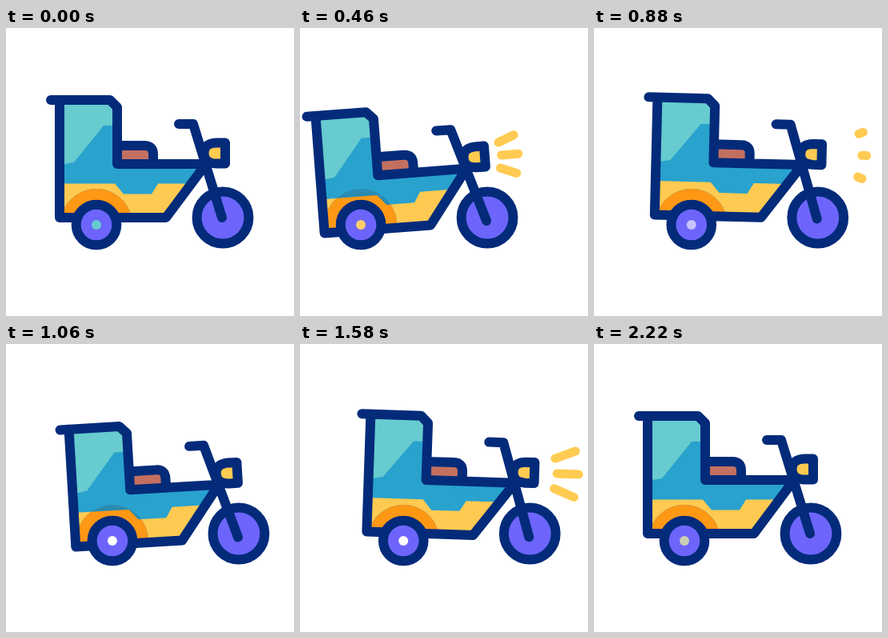
Write an HTML page that moves like this. It is 360x360 px and loops after 2.42 s.

```html
<!DOCTYPE html>
<html lang="en">
<head>
<meta charset="utf-8">
<title>Electric rickshaw</title>
<style>
  html, body { margin: 0; width: 100%; height: 100%; overflow: hidden; background: #fff; }
  svg { display: block; width: 100vw; height: 100vh; }
  .line { fill: none; stroke: #032b7a; stroke-width: 12; stroke-linecap: round; stroke-linejoin: round; }
  .wheel { fill: #6d65fb; stroke: #032b7a; stroke-width: 12; }
  #rays { stroke: #ffcb52; stroke-width: 11; stroke-linecap: round; }
</style>
</head>
<body>
<svg viewBox="0 0 360 360">
  <defs>
    <path id="hull" d="M67 90H130L139 99V170H250L200 237H67Z"/>
    <path id="stripe" d="M67 194.5H136L147 207.5H182L190 194.5H232L200 237H67Z"/>
    <path id="lampShape" d="M274 143.5H263Q247.5 144 247.5 156.5T263 169.5H274Z"/>
    <clipPath id="shell"><use class="tilt" href="#hull"/></clipPath>
    <clipPath id="band"><use class="tilt" href="#stripe"/></clipPath>
  </defs>
  <g id="car">
    <g class="tilt">
      <use href="#hull" fill="#29a2ce"/>
      <path fill="#67cbcf" d="M67 90H130L139 99V122H122L85 168L73 170H67Z"/>
      <use href="#stripe" fill="#ffca51"/>
      <path fill="#c47060" d="M139 147H173Q184 147 184 158V170H139Z"/>
      <use id="lamp" href="#lampShape"/>
      <path fill="#ffca51" d="M265 151H270V161H265Z"/>
    </g>
    <circle cx="113" cy="246" r="45" fill="#2a8cb1" clip-path="url(#shell)"/>
    <circle cx="113" cy="246" r="45" fill="#ff9814" clip-path="url(#band)"/>
    <circle class="wheel" cx="271" cy="237" r="32.4"/>
    <g class="tilt">
      <g class="line">
        <path d="M56 90H130L139 99V170H250L200 237H67V90M139 147H173Q184 147 184 158V170M216 120H234L270 237"/>
        <use href="#lampShape"/>
      </g>
      <g id="rays"><line/><line/><line/></g>
    </g>
    <circle class="wheel" cx="113" cy="246" r="25.3"/>
    <circle id="hub" cx="113" cy="246" r="6"/>
  </g>
</svg>
<script>
const $ = id => document.getElementById(id);
const tilted = document.querySelectorAll('.tilt');
const rays = document.querySelectorAll('#rays line');
const hubShimmer = ['#66cbcf', '#ffd068', '#c8c3fc', '#fff', '#fff', '#ffd068', '#cdcfb4'];

// Progress from 0 to 1 between two times, plain and eased.
const ramp = (t, from, to) => Math.min(1, Math.max(0, (t - from) / (to - from)));
const smooth = (...span) => { const p = ramp(...span); return p * p * (3 - 2 * p); };
const cubic = (...span) => {
  const p = ramp(...span);
  return p < 0.5 ? 4 * p ** 3 : 1 - 4 * (1 - p) ** 3;
};
const mix = (a, b, p) => a + (b - a) * p;

// Back up, surge forward, return.
const drive = t => -37 * cubic(t, 0, 500) + 57 * cubic(t, 500, 1100) - 20 * cubic(t, 1400, 1900);

const sway = t => -4.4 * smooth(t, 0, 480) + 8.4 * smooth(t, 480, 760) - 7.4 * smooth(t, 760, 1060)
  + 7 * smooth(t, 1060, 1380) - 5 * smooth(t, 1380, 1900) + 1.4 * smooth(t, 1900, 2200);

const bounce = t => 4 * (smooth(t, 0, 480) - smooth(t, 480, 760))
  + 4.4 * (smooth(t, 760, 1060) - smooth(t, 1550, 2200));

function drawRays(t) {
  const pulse = t < 1200 ? t : t - 980;
  const lit = pulse > 300 && pulse < 960;
  const head = 1 - (1 - ramp(pulse, 300, 620)) ** 1.5;
  const tail = ramp(pulse, 300, 940) ** 1.6;
  $('rays').style.display = lit ? '' : 'none';
  $('lamp').setAttribute('fill', lit && tail > 0.9 ? '#fff' : '#ffca51');
  rays.forEach((ray, i) => {
    const side = i - 1, spread = Math.abs(side);
    [tail, head].forEach((p, end) => {
      // The tiny offset keeps a fully shrunken ray visible as a dot.
      ray.setAttribute('x' + (end + 1), mix(290.5 - 2 * spread, 330 - 5 * spread, p) + end * 0.01);
      ray.setAttribute('y' + (end + 1), 156.5 + side * mix(14.5, 29, p));
    });
  });
}

function draw(t) {
  $('car').setAttribute('transform', `translate(${drive(t)} 0)`);
  for (const part of tilted) {
    part.setAttribute('transform', `translate(0 ${bounce(t)}) rotate(${sway(t)} 271 237)`);
  }
  drawRays(t);
  $('hub').setAttribute('fill', hubShimmer[Math.floor(t / 330)]);
}

function tick() {
  const t = performance.now() % 2420;
  draw(Math.min(2220, Math.floor(t / 20) * 20));
  requestAnimationFrame(tick);
}
tick();
</script>
</body>
</html>
```
